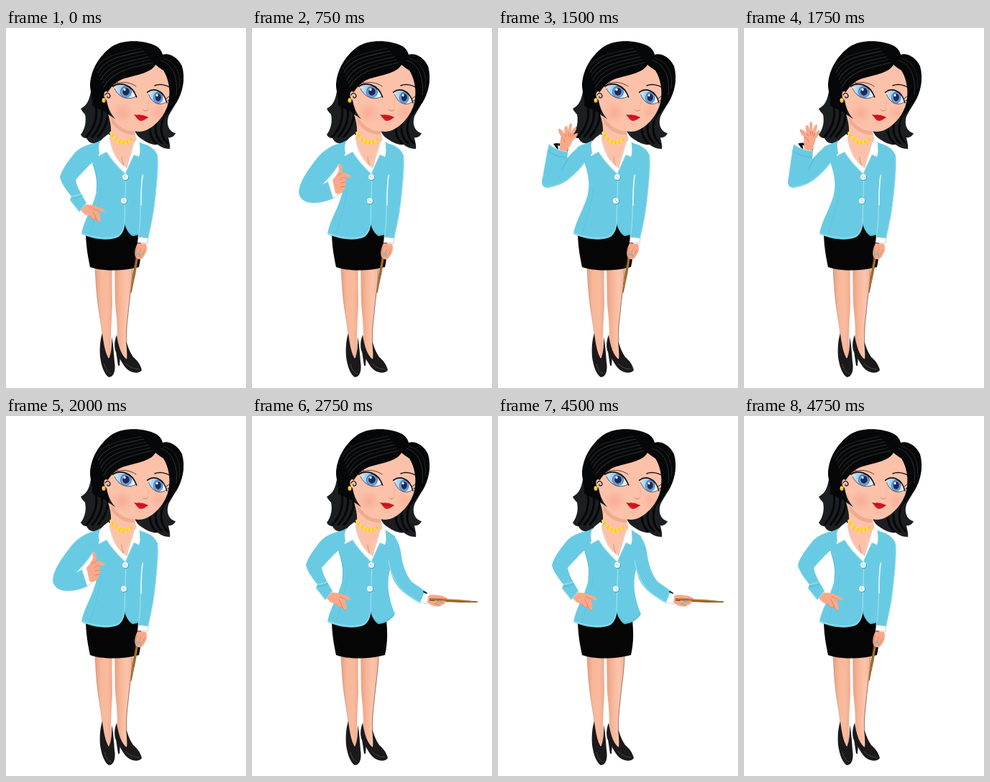
These frames come from a looping animation (334 px wide and 500 px high, 5000 ms). An HTML page with a canvas:

```html
<!DOCTYPE html>
<html lang="en">
<head>
<meta charset="utf-8">
<title>Waving teacher</title>
<style>
html, body { margin: 0; width: 100%; height: 100%; overflow: hidden; background: #fff; }
canvas { display: block; width: 334px; height: 500px; }
</style>
</head>
<body>
<canvas id="stage"></canvas>
<script>
const W = 334, H = 500, LOOP = 5000;
const canvas = document.getElementById('stage');
const c = canvas.getContext('2d');
const dpr = window.devicePixelRatio || 1;
canvas.width = W * dpr;
canvas.height = H * dpr;

const BLUE = '#69cbe3', PALE = '#a9e4f0', EDGE = '#4aaec8';
const SKIN = '#fcc2a9', HAND = '#f9a989', SHADE = '#d9805f';
const HAIR = '#060708', CURL = '#1c1f21', WHITE = '#fff';

function fill(d, color) {
  c.fillStyle = color;
  c.fill(new Path2D(d));
}
function line(d, color, width = 1) {
  c.strokeStyle = color;
  c.lineWidth = width;
  c.stroke(new Path2D(d));
}
function oval(x, y, rx, ry, color, turn = 0) {
  c.fillStyle = color;
  c.beginPath();
  c.ellipse(x, y, rx, ry, turn, 0, Math.PI * 2);
  c.fill();
}
function glow(x, y, r, rgb, alpha) {
  const g = c.createRadialGradient(x, y, 0, x, y, r);
  g.addColorStop(0, `rgba(${rgb},${alpha})`);
  g.addColorStop(1, `rgba(${rgb},0)`);
  oval(x, y, r, r, g);
}
function across(x0, x1, ...colors) {
  const g = c.createLinearGradient(x0, 0, x1, 0);
  colors.forEach((col, i) => g.addColorStop(i / (colors.length - 1), col));
  return g;
}
function turned(x, y, deg, draw) {
  c.save();
  c.translate(x, y);
  c.rotate(deg * Math.PI / 180);
  c.translate(-x, -y);
  draw();
  c.restore();
}

function legs() {
  const left = 'M124 332C125 352 126 368 128 384C131 404 134 418 135 432L139 459L147 455C145 430 147 408 148 384C148 364 147 350 148 332Z';
  const right = 'M151 332C152 356 151 376 153 394C155 412 155 424 155 440L165 462L171 457C166 440 168 418 170 396C172 374 175 358 176 332Z';
  fill(left, across(123, 150, '#e79c7c', '#f8b798', '#f9ba9e', '#eda488'));
  fill(right, across(150, 177, '#e79c7c', '#f7b597', '#fcc5ac', '#f3b297'));
  line('M176 335C175 358 172 374 170 396C168 412 167 424 168 434', '#6f4a3d', .7);
  line('M124 335C125 352 126 368 128 384C130 400 133 414 134 426', '#a0705c', .5);
}

function shoes() {
  const black = '#1b191a';
  fill('M134 424C131 433 130 445 131 457C133 471 137 481 143 485C150 485 153 476 151 464C150 449 149 438 147 429C147 442 147 452 143 459C138 452 136 438 134 424Z', black);
  fill('M154 426C151 434 150 443 153 450C158 456 161 468 170 475C177 480 186 480 189 475C187 467 182 461 177 457C173 451 169 442 167 433C168 446 169 455 168 460C161 456 156 441 154 426Z', black);
  fill('M152 442L159 455L158 469L156 469Z', black);
  line('M137 467C139 475 142 479 146 480', '#4b4749', 1);
  line('M167 466C173 472 179 474 185 474', '#4b4749', 1);
}

function backHair() {
  fill('M122 72C116 90 119 104 104 112C106 116 108 118 110 120C112 130 110 140 104 148C106 152 109 153 112 153C114 157 117 160 121 160C129 161 136 155 140 150L150 146L156 92Z', CURL);
  fill('M226 75L247 72C244 98 232 110 226 123C222 136 229 145 236 146C234 151 229 153 226 152C227 158 229 163 228 168C221 168 215 165 211 162C204 163 196 159 190 155C185 152 181 148 179 142L202 110Z', CURL);
  [0, 8, 16].forEach(n => {
    line(`M${124 + n} 104C${129 + n} 124 ${122 + n} 140 ${112 + n} 151`, HAIR, 3);
    line(`M${228 - n} 108C${211 - n} 132 ${214 - n} 150 ${225 - n} 160`, HAIR, 3);
  });
}

function skirt() {
  fill('M111 282C111 302 114 318 117 332C133 338 162 338 185 332C189 314 189 298 186 276L166 268Z', '#050505');
}

function torso() {
  fill('M142 120C148 138 147 149 142 155L150 190L166 200L184 165L179 144Z', SKIN);
  fill('M146 122C156 138 168 144 180 143L179 148C165 149 154 141 147 132Z', '#f0ac8f');
  fill('M131 156C124 161 117 161 110 166L121 189C126 205 128 216 125 231C120 251 108 267 105 286C119 293 143 297 157 290C163 285 165 278 165 272C168 281 171 286 176 289C185 288 194 284 199 275C193 260 188 245 190 224C193 205 201 184 199 167L184 157L166 198Z', BLUE);
  line('M106 285C121 291 145 295 157 288C163 283 165 275 165 268L167 202', PALE, 1);
  line('M165 272C168 281 172 286 177 288C186 286 193 282 198 275', EDGE, .8);
  line('M133 222C130 244 123 267 117 286', '#60bfd8', .8);
  // shirt and collar
  fill('M143 147C137 151 131 156 130 160C128 167 129 173 129 178L140 172C147 184 157 194 166 203C170 193 174 184 178 176L185 179C188 170 187 162 184 152L178 160C175 173 171 184 168 195C158 184 149 170 144 154Z', WHITE);
  fill('M144 153C146 169 153 183 163 191L169 184C174 176 177 168 178 158C166 163 154 161 144 153Z', SKIN);
  line('M164 191C162 187 161 183 161 179', SHADE, .8);
  line('M130 177L140 172C148 184 157 194 166 202L178 176L184 178', '#b9dce4', .8);
  line('M144 154C148 171 155 184 165 194L178 161', '#d9dde1', .8);
  for (let i = 0; i < 12; i++) {
    const t = i / 11;
    oval(146 + 28 * t, 146 + 9 * t + 32 * t * (1 - t), 1.9, 2.2 + Math.sin(t * Math.PI) * .7, i % 2 ? '#ffc928' : '#ffe04a');
  }
  [[166, 207], [164, 240]].forEach(([x, y]) => {
    oval(x + .6, y + .7, 4.3, 4.2, '#3d9ebb');
    oval(x, y, 4, 4, '#eefafd');
    oval(x - 1, y - 1, .7, .7, '#7fa7b4');
    oval(x + 1, y + 1, .7, .7, '#7fa7b4');
  });
}

function eye(x, y, s, tilt) {
  c.save();
  c.translate(x, y);
  c.rotate(tilt);
  c.scale(s, 1);
  const white = 'M-17 -4C-9 -12 8 -12 16 4C8 11 -8 10 -17 -4Z';
  fill(white, across(-17, 16, '#d5eefb', '#8fcdf1', '#b5def5', WHITE));
  c.save();
  c.clip(new Path2D(white));
  oval(1, -.5, 8.3, 8.2, '#3d69ad');
  oval(1, 0, 7.4, 7.4, '#6f9bd8');
  oval(1, -.6, 5, 5.2, '#1c2a50');
  oval(-1.5, -3.4, 1.7, 1.7, WHITE);
  c.restore();
  line('M-19 -6C-10 -13 8 -13 17 5', '#101014', 1.8);
  line('M-16 -3C-8 10 8 11 16 4', '#413034', .8);
  c.restore();
}

function head() {
  fill('M145 67C137 84 138 104 146 118C154 132 170 143 185 144C200 144 217 128 224 110C230 92 230 68 219 51L205 42Z', SKIN);
  glow(162, 118, 16, '242,126,109', .32);
  glow(212, 117, 12, '242,126,109', .25);
  eye(166, 89, .96, .12);
  eye(211, 97, .8, .12);
  line('M149 82L145 78M152 79L148 74M156 77L153 73', '#111', .9);
  line('M225 101L229 99M223 98L227 95', '#111', .9);
  line('M152 78C162 73 174 76 181 81', '#4a302a', .9);
  line('M207 80C214 77 223 79 229 83', '#1b1514', 1.4);
  line('M190 113C192 116 196 116 198 113', SHADE, 1);
  line('M198 101C199 106 198 109 197 111', '#f1ad94', .8);
  fill('M178 120C182 122 185 119 188 121C191 120 194 123 198 124C194 127 191 129 187 129C183 128 181 123 178 120Z', '#df151f');
  line('M179 121C185 124 191 125 197 124', '#8d151d', .8);
  line('M184 133C187 134 190 134 192 133', '#efaa92', .9);

  fill('M117 81C117 60 129 39 147 26C165 15 192 17 209 25C215 29 217 33 218 37C226 34 239 40 245 53C250 70 246 90 237 104L221 124C230 102 230 76 219 59C215 56 211 54 208 51C202 62 183 65 169 69C155 72 149 79 143 87C137 94 138 108 143 119L120 108C121 100 118 92 117 81Z', HAIR);
  for (let i = 0; i < 6; i++) {
    line(`M${204 - i * 3} ${48 - i * 4}C${182 - i * 4} ${54 - i * 4} ${149 - i * 3} ${57 - i * 4} ${136 - i * 2} ${82 - i * 5}`, i % 2 ? '#202325' : '#2c3032', 1.1);
  }
  line('M215 45C230 49 240 66 237 93', '#2c3032', 1);
  line('M219 42C237 47 244 65 241 84', '#242729', 1);
  oval(140, 94, 3.5, 6, SKIN, -.2);
  line('M138 93C140 89 144 90 145 94C145 98 140 98 141 95', '#111', 1.2);
  oval(136, 100.5, 2.5, 3.3, '#f7bd24');
  oval(135.5, 99.5, 1, 1.2, '#fff09b');
}

function stick(x0, y0, x1, y1) {
  const len = Math.hypot(x1 - x0, y1 - y0);
  c.save();
  c.translate(x0, y0);
  c.rotate(Math.atan2(y1 - y0, x1 - x0));
  fill(`M0 -1.8L${len * .6} -1.8L${len} -.5V.5L${len * .6} 1.8L0 1.8Z`, '#8f5a1d');
  line(`M0 -.6L${len * .85} -.4`, '#c98b3c', .8);
  c.restore();
}

function nails(...spots) {
  spots.forEach(([x, y]) => oval(x, y, 1.8, 1.3, '#54c9d8', .5));
}

const leftArm = {
  hip() {
    fill('M128 159C116 161 105 164 96 173C87 184 78 196 75 207C77 216 84 225 91 234L89 239L102 256L112 243L105 231C101 224 98 217 97 211C104 203 112 194 120 187L130 174Z', BLUE);
    line('M89 239L102 255L112 243M91 234L105 231', PALE, 1);
    line('M91 236C94 238 100 236 105 233', EDGE, .8);
    line('M121 189C126 204 128 216 126 226', EDGE, .7);
    fill('M104 253L111 245C116 246 122 245 127 248C132 250 137 252 138 255C135 257 132 255 129 254C131 260 132 266 131 271C128 271 127 267 125 264C123 269 119 266 117 261C112 261 108 258 104 253Z', HAND);
    line('M117 261C119 265 122 268 125 264C124 260 122 257 121 255M125 264C127 268 129 271 131 270M129 254L122 251', SHADE, .9);
  },
  chest() {
    fill('M128 159C113 161 99 169 88 184C77 199 66 213 65 228C66 239 76 243 86 243C96 243 105 240 113 237L106 213C103 215 100 216 98 217C106 209 115 199 121 189L130 174Z', BLUE);
    line('M121 189C114 201 106 210 98 217L107 213', PALE, 1);
    fill('M105 212L111 207L120 231L113 237Z', WHITE);
    line('M105 212L113 237L120 231', '#b2c6cd', .8);
    fill('M112 211C116 207 119 202 121 197C120 193 120 189 122 188C126 190 126 197 126 201C131 201 136 203 138 206C136 208 132 208 130 208C131 214 131 220 128 225C125 230 119 232 116 229Z', HAND);
    line('M130 208C126 207 124 209 123 211M130 214L124 215M129 220L123 221M126 201C124 203 122 204 120 205', SHADE, .9);
  },
  wave(fore, wrist) {
    fill('M129 159C117 161 108 167 99 178L87 190L62 207C60 214 62 220 68 222C80 221 92 216 100 209C109 201 116 194 121 187L131 174Z', BLUE);
    turned(70, 212, fore, () => {
      fill('M77 161C84 158 93 162 98 168L96 175L82 168Z', '#0c0c0d');
      fill('M83 163L97 168L95 174L84 169Z', WHITE);
      turned(91, 167, wrist, openHand);
      fill('M71 161C79 168 88 171 97 172C97 184 93 196 87 206L68 222C62 221 60 217 62 210C64 196 67 178 71 161Z', BLUE);
      line('M71 162C79 168 88 171 97 172', PALE, 1);
      line('M69 170C77 177 87 180 96 180', EDGE, .7);
    });
    line('M98 180C95 187 92 192 89 196', EDGE, .8);
    line('M67 221C80 220 92 215 100 208C108 201 115 194 120 187', PALE, .8);
  }
};

function openHand() {
  fill('M85 170C86 160 87 155 88 150C85 146 84 142 85 140C88 140 91 144 93 147C92 142 92 136 95 136C97 136 98 142 98 145C98 139 99 132 102 132C104 134 102 141 101 146C104 141 107 136 109 138C110 141 106 146 104 149C108 146 111 145 111 147C110 151 106 154 104 156C102 161 99 165 96 172Z', HAND);
  line('M93 147L94 151M98 145L98 150M101 146L100 151M104 149L101 153M88 152C92 153 93 156 93 159', SHADE, .9);
  line('M85 140C84 143 86 147 88 150M111 147C109 152 106 154 104 156', SHADE, .6);
}

const rightArm = {
  down() {
    fill('M186 160C197 161 207 167 211 177C213 191 210 213 208 234C205 257 202 276 198 292L184 290C187 271 185 250 187 231C189 211 187 190 187 176Z', BLUE);
    line('M191 203C187 222 188 240 187 254C187 268 186 281 184 290M211 179C212 202 208 235 205 258L198 291', PALE, 1);
    line('M190 205C188 218 188 230 188 246', '#e6f7fb', 1.6);
    fill('M184 290L198 292L197 299L183 298Z', WHITE);
    line('M184 290L198 292L197 299L183 298', '#a9bdc4', .7);
    stick(185, 302, 174, 368);
    fill('M183 299L195 300C197 306 196 311 193 315C191 320 186 324 181 319C178 315 179 307 183 299Z', HAND);
    line('M183 305C180 309 180 314 183 318M188 307C185 311 186 316 188 319M193 308L190 315', SHADE, .9);
    nails([184, 314], [187, 316]);
  },
  level() {
    fill('M186 160C198 163 204 173 207 188C209 206 214 220 222 230L242 244L234 260C219 252 204 242 197 228C193 219 191 209 189 200Z', BLUE);
    line('M190 201C193 218 200 235 216 248L234 259M242 244L234 260', PALE, 1);
    fill('M239 246L246 250L244 261L234 259Z', WHITE);
    line('M239 244L243 246', '#111', 1.8);
    line('M246 250L244 261L235 259', '#b2c6cd', .7);
    fill('M246 249C253 247 260 249 266 250L272 253C270 257 267 261 262 264C256 266 249 263 244 259Z', HAND);
    stick(247, 255, 318, 258.5);
    fill('M254 256C260 257 266 256 270 257C270 261 264 263 259 264L253 262Z', HAND);
    line('M253 253L269 254M253 260L262 263M258 258L266 259', SHADE, .8);
    nails([257, 260], [262, 258]);
  },
  up() {
    fill('M186 160C198 163 204 173 208 185L214 195L236 184L245 197C236 208 228 216 218 219C207 217 198 209 190 200Z', BLUE);
    line('M191 200C200 210 209 217 218 219C229 215 237 206 245 197M214 195L208 186', PALE, 1);
    fill('M235 184L241 181L249 194L244 198Z', WHITE);
    line('M236 184L245 198L249 194', '#b2c6cd', .7);
    fill('M241 183C242 177 246 173 251 171L256 174L259 179C258 185 254 188 248 191Z', HAND);
    stick(244, 188, 279, 146);
    fill('M246 180C249 176 253 174 258 176C259 179 254 181 250 183L255 183C255 187 250 188 247 187Z', HAND);
    line('M246 180L253 176M250 183L257 179M248 187L254 185', SHADE, .8);
    nails([253, 181], [252, 185]);
  }
};

const { hip, chest, wave } = leftArm;
const { down, level, up } = rightArm;
const waveIn = () => wave(0, 0);
const waveOut = () => wave(-2, -9);

// each step: end time, left arm, right arm
const steps = [
  [750, hip, down], [1000, chest, down],
  [1250, waveIn, down], [1500, waveOut, down],
  [1750, waveIn, down], [2000, waveOut, down],
  [2250, chest, down], [2750, hip, down],
  [3000, hip, level], [4500, hip, up],
  [4750, hip, level], [LOOP, hip, down]
];

function draw(t) {
  const [, left, right] = steps.find(s => t < s[0]);
  c.setTransform(dpr, 0, 0, dpr, 0, 0);
  c.fillStyle = WHITE;
  c.fillRect(0, 0, W, H);
  c.save();
  c.beginPath();
  c.rect(0, 0, 314, H);
  c.clip();
  c.lineCap = c.lineJoin = 'round';
  legs();
  shoes();
  skirt();
  backHair();
  torso();
  head();
  right();
  left();
  c.restore();
}

const start = performance.now();
function tick() {
  draw((performance.now() - start) % LOOP);
  requestAnimationFrame(tick);
}
tick();
</script>
</body>
</html>
```
